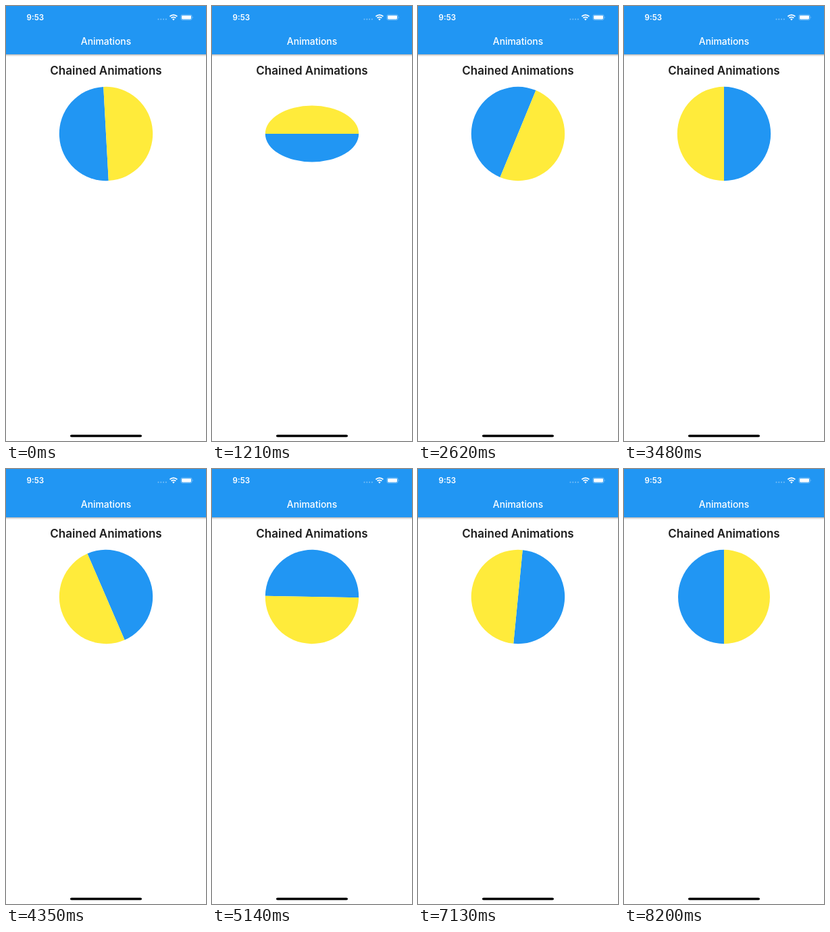
Write an HTML page that moves like this. It is 296x640 px and loops after 8.28 s.

```html
<!DOCTYPE html>
<html lang="en">
<head>
<meta charset="utf-8">
<title>Chained Animations</title>
<style>
  html, body { margin: 0; width: 100%; height: 100%; overflow: hidden; background: #fff; }
  svg { display: block; width: 296px; height: 640px; font-family: Inter, Roboto, sans-serif; }
  .bar { fill: #2196f3; filter: drop-shadow(0 1.5px 1.5px #0006); }
</style>
</head>
<body>
<svg viewBox="0 0 296 640">
  <rect class="bar" x="-10" y="-10" width="316" height="81"/>
  <g fill="#fff">
    <text x="30.6" y="21" font-size="11.6" font-weight="600">9:53</text>
    <text x="148" y="56.6" font-size="13.9" font-weight="500" text-anchor="middle">Animations</text>
    <g opacity=".4">
      <circle cx="225.5" cy="19.5" r="1"/><circle cx="229.3" cy="19.5" r="1"/>
      <circle cx="233.1" cy="19.5" r="1"/><circle cx="236.9" cy="19.5" r="1"/>
    </g>
    <g fill="none" stroke="#fff" stroke-width="1.8">
      <path d="M242.4 15.4a7.8 7.8 0 0 1 11 0M244.5 17.7a4.8 4.8 0 0 1 6.8 0"/>
    </g>
    <path d="M247.9 21.2l-1.7-1.8a2.4 2.4 0 0 1 3.4 0z"/>
    <rect x="258.9" y="12.9" width="16.2" height="7.6" rx="2.2" fill="none" stroke="#fff" stroke-width=".8" opacity=".45"/>
    <rect x="260" y="14" width="14" height="5.4" rx="1.3"/>
    <path d="M276 15.4q1.4 1.3 0 2.6z" opacity=".5"/>
  </g>
  <text x="148" y="101" font-size="17" font-weight="600" fill="#1d1d1d" text-anchor="middle">Chained Animations</text>
  <g id="disc">
    <path d="M0-69.2a69.2 69.2 0 0 0 0 138.4z" fill="#2196f3"/>
    <path d="M0-69.2a69.2 69.2 0 0 1 0 138.4z" fill="#ffeb3b"/>
  </g>
  <rect x="95" y="630.7" width="106" height="3.6" rx="1.8"/>
</svg>
<script>
const LOOP = 8280, DURATION = 1030, TICK = 107.5;
// Turns and flips alternate, each beginning at one of these times.
const starts = [-70, 1004, 2059, 3105, 4160, 5223, 6287, 7357];
// The picture refreshes in ticks, realigned at these times.
const ticks = [0, 120, 990, 1860, 2730, 3590, 4460, 5340, 6190, 7020, 7860];
const disc = document.getElementById('disc');

function bounceOut(t) {
  const k = 7.5625, d = 2.75;
  if (t < 1 / d) return k * t * t;
  if (t < 2 / d) return k * (t - 1.5 / d) ** 2 + 0.75;
  if (t < 2.5 / d) return k * (t - 2.25 / d) ** 2 + 0.9375;
  return k * (t - 2.625 / d) ** 2 + 0.984375;
}

function stepped(time) {
  const i = ticks.findLastIndex(t => t <= time);
  const step = i > 0 && i < 10 ? (ticks[i + 1] - ticks[i]) / 8 : TICK;
  const n = Math.floor((time - ticks[i]) / step + 0.03);
  return ticks[i] + n * step;
}

function draw(now) {
  const time = stepped(now % LOOP);
  const progress = [0, 0];
  starts.forEach((start, i) => {
    const t = Math.min(1, Math.max(0, (time - start) / DURATION));
    progress[i % 2] += bounceOut(t);
  });
  const [turn, flip] = progress;
  disc.setAttribute('transform',
    `translate(148 188) rotate(${-90 * turn}) scale(${Math.cos(Math.PI * flip)} 1)`);
  requestAnimationFrame(draw);
}
draw(performance.now());
</script>
</body>
</html>
```
